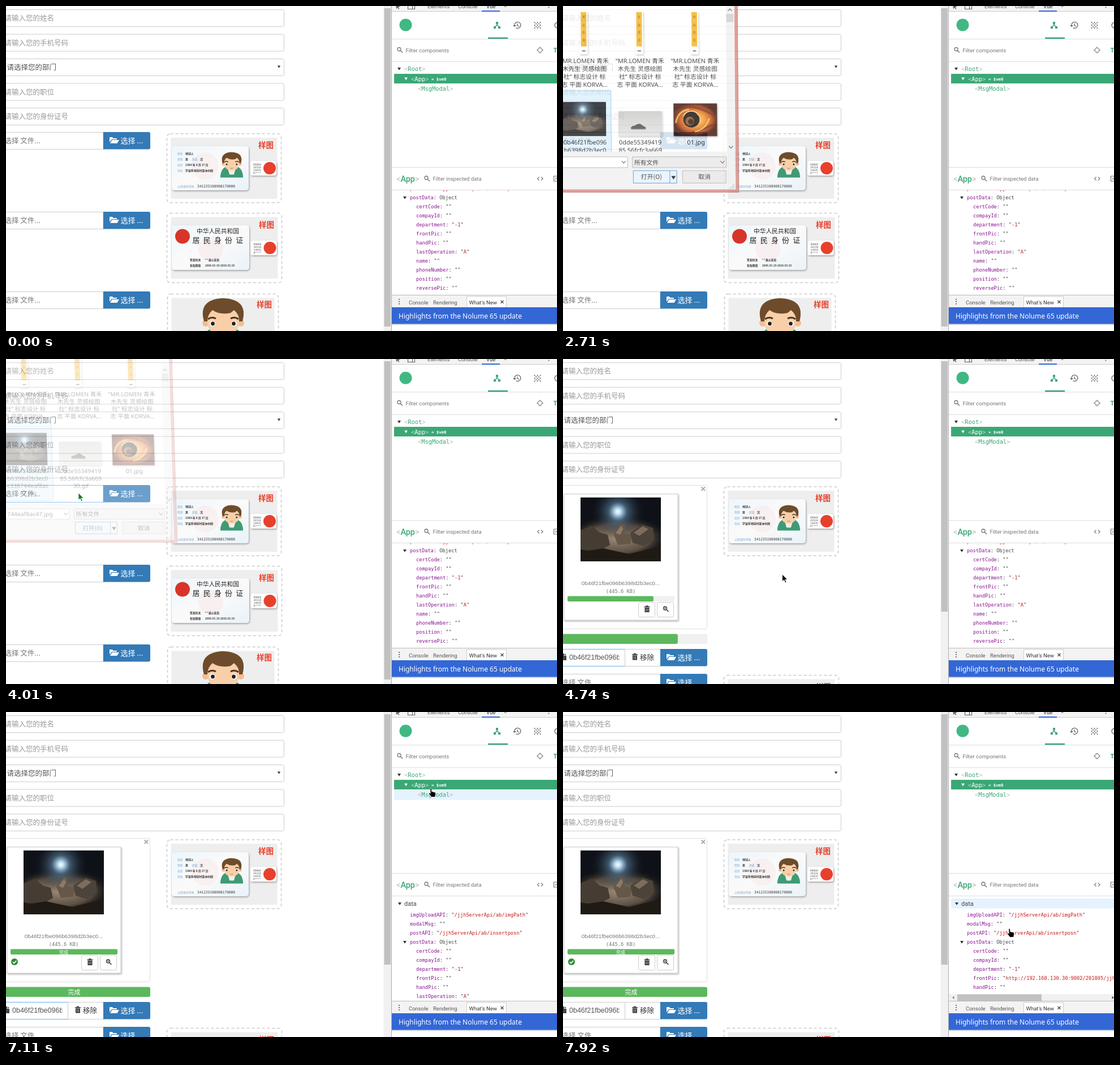
Write an HTML page that moves like this. It is 974 px wide and 575 px high and loops after 8000 ms.

```html
<!DOCTYPE html>
<html lang="zh">
<head>
<meta charset="utf-8">
<title>Upload form</title>
<style>
html,body{margin:0;width:100%;height:100%;overflow:hidden;background:#fff}
svg{display:block}
text{font-family:'Noto Sans CJK SC','Noto Sans CJK','Noto Sans',sans-serif}
.r{font-family:Roboto,sans-serif}
.m{font-family:'DejaVu Sans Mono',monospace}
.a{font-family:'Liberation Sans',Arial,sans-serif}
.n{font-family:'Noto Sans','Noto Sans CJK SC',sans-serif}
.mid{text-anchor:middle}
.b{font-weight:bold}
</style>
</head>
<body>
<svg id="stage" width="974" height="575" viewBox="0 0 974 575"></svg>
<script>
const GREEN = '#3ba776', RED = '#e8402c', LOOP = 8000;
const esc = s => s.replace(/&/g, '&amp;').replace(/</g, '&lt;');
const txt = (x, y, s, size, fill = '#333', cls = '', more = '') =>
  `<text x="${x}" y="${y}" font-size="${size}" fill="${fill}" class="${cls}" ${more}>${esc(s)}</text>`;
const box = (x, y, w, h, fill, more = '') =>
  `<rect x="${x}" y="${y}" width="${w}" height="${h}" fill="${fill}" ${more}/>`;
const path = (d, fill, more = '') => `<path d="${d}" fill="${fill}" ${more}/>`;
const line = (d, color, w = 1, more = '') => path(d, 'none', `stroke="${color}" stroke-width="${w}" ${more}`);
const dot = (x, y, r, fill, more = '') => `<circle cx="${x}" cy="${y}" r="${r}" fill="${fill}" ${more}/>`;
const at = (x, y, inner, more = '') => `<g transform="translate(${x} ${y})" ${more}>${inner}</g>`;
const grp = (id, inner, more = '') => `<g id="${id}" ${more}>${inner}</g>`;
const edge = (c, r = 3) => `stroke="${c}" rx="${r}"`;

const defs = `<defs>
<radialGradient id="glow"><stop offset="0" stop-color="#fff"/><stop offset=".12" stop-color="#b4d8f0"/><stop offset=".35" stop-color="#4d6c86" stop-opacity=".75"/><stop offset="1" stop-color="#10161f" stop-opacity="0"/></radialGradient>
<radialGradient id="dust"><stop offset="0" stop-color="#a08d77"/><stop offset=".6" stop-color="#6b5c4c" stop-opacity=".85"/><stop offset="1" stop-color="#15120f" stop-opacity="0"/></radialGradient>
<radialGradient id="fire"><stop offset="0" stop-color="#ffdf80"/><stop offset=".45" stop-color="#ef8a1c"/><stop offset=".75" stop-color="#b8440a"/><stop offset="1" stop-color="#3a0d04"/></radialGradient>
<linearGradient id="card" x2="1" y2="1"><stop offset="0" stop-color="#edf6fb"/><stop offset=".5" stop-color="#fbfafa"/><stop offset="1" stop-color="#e9f3f9"/></linearGradient>
<linearGradient id="haze" y2="1" x2="0"><stop offset="0" stop-color="#c9c9c7"/><stop offset="1" stop-color="#e2e2e0"/></linearGradient>
<filter id="soft" x="-20%" y="-20%" width="150%" height="150%"><feDropShadow dx="1" dy="1.5" stdDeviation="1.5" flood-opacity=".35"/></filter>
<symbol id="space" viewBox="0 0 142 113" preserveAspectRatio="none">
${box(0, 0, 142, 113, '#0e1117')}
<ellipse cx="66" cy="72" rx="92" ry="42" fill="url(#dust)"/>
${dot(66, 25, 48, 'url(#glow)')}
${path('M0 58 20 50 34 62 48 66 52 84 30 96 0 92Z', '#453c34')}
${path('M58 64 72 46 79 50 76 62 92 66 88 82 66 84Z', '#665849')}
${path('M88 62 110 48 128 54 130 74 112 86 92 80Z', '#4c433a')}
${path('M94 62 110 51 120 56 104 68Z', '#7c6d5d')}
${path('M0 96 40 90 86 100 142 86V113H0Z', '#201a15')}
${path('M62 63 72 50 75 56 70 66Z', '#8b7b6a')}
</symbol>
<clipPath id="listClip">${box(-60, -70, 368, 328, '#000')}</clipPath>
<clipPath id="dataClip"><rect id="dataArea" x="682" y="326" width="292" height="185"/></clipPath>
<clipPath id="nameClip">${box(0, 514, 99.5, 28, '#000')}</clipPath>
</defs>`;

// icons
const folder = path('M0 10V2q0-1 1-1h4l1.5 2h5.5q1 0 1 1v1H4Z', '#fff') + path('M1 12 4.5 6H17l-3.5 6Z', '#fff');
const trash = c => line('M0 2.5H10M3.5 2V.8H6.5V2', c, 1.3) + path('M1 4H9V12H1Z', c) + line('M3.5 5.5V10.5M6.5 5.5V10.5', '#fff', .8);
const pencil = path('M0 9V7L6 1 8 3 2 9ZM6.7.4 7.5-.4 9.4 1.6 8.6 2.4Z', '#777');
const lens = c => dot(0, 0, 3, 'none', `stroke="${c}" stroke-width="1.3"`) + line('M2.2 2.2 6 6', c, 1.5);
const down = (x, y, c = '#333', w = 3) => path(`M${x - w} ${y - 2}h${2 * w}l${-w} ${w * 1.6}Z`, c);
const chev = (x, y, s = 1) => line(`M${x - 3.5} ${y - 2 * s}l3.5 ${4 * s} 3.5 ${-4 * s}`, '#555', 1.2);

// left-hand form
const man =
  path('M-42 95Q-41 62-20 54L0 72 20 54Q41 62 42 95Z', '#3f9a76') +
  path('M-16 56H16L8 84H-8Z', '#f3efe6') +
  dot(-31, 45, 6, '#f1bd93') + dot(31, 45, 6, '#f1bd93') +
  box(-28, 12, 56, 56, '#f8cfa8', 'rx="25"') +
  path('M-34 42Q-45 4-2 1 45 2 34 42L28 42Q29 30 19 22L13 27Q-6 31-19 22-28 30-28 42Z', '#6e4c2b') +
  line('M-27 38Q-20 33-13 37M13 37Q20 33 27 38', '#4b3520', 3) +
  dot(-19, 46, 5, '#fff') + dot(19, 46, 5, '#fff') + dot(-18.5, 46, 3.4, '#222') + dot(18.5, 46, 3.4, '#222') +
  line('M-5 60Q0 63 5 60', '#b5543c', 1.6);

const frame = (x, y, w, h) =>
  box(x, y, w, h, '#fff', 'rx="6" stroke="#ccc" stroke-width="1.6" stroke-dasharray="5 4"') +
  box(x + 7, y + 7, w - 14, h - 14, '#eee');
const sample = (x, y) => txt(x, y, '样图', 13.5, RED, 'b');
const chip = (x, y) => box(x, y, 46, 26, '#fff', 'rx="4" filter="url(#soft)"') +
  ['89860', '2E518', '14035', '8****'].map((s, i) => txt(x + 5, y + 8 + i * 5, s, 4.6, '#555', 'm')).join('') +
  dot(x + 34, y + 13, 11, RED);
const pair = (x, y, k, v) => txt(x, y, k, 4.8, '#6fa5d2') + txt(x + 14, y, v, 4.9, '#333', 'b');

const front = frame(284.5, 226, 202, 122) + sample(446, 251) +
  box(293, 248, 136, 78, 'url(#card)', 'rx="5" filter="url(#soft)"') +
  dot(352, 283, 24, '#f6dfe0', 'opacity=".35"') +
  pair(303, 263, '姓名', '地球人') + pair(303, 273, '性别', '男') + pair(329, 273, '民族', '汉') +
  pair(303, 283, '出生', '1989 年 8 月 17 日') + pair(303, 293, '住址', '宇宙系地球村亚洲中国') +
  txt(303, 320.5, '公民身份号码', 4.9, '#6fa5d2') + txt(338, 321, '341225198908170000', 6.2, '#333', 'm') +
  at(399, 258, `<g transform="scale(.48)">${man}</g>`) + chip(432, 274);

const back = frame(284.5, 366.5, 203, 123) + sample(447, 391.5) +
  box(293, 388, 137, 79, 'url(#card)', 'rx="5" filter="url(#soft)"') +
  dot(362, 430, 22, '#f6dfe0', 'opacity=".4"') + dot(312, 407.5, 13, '#d8352a') +
  txt(337, 402, '中华人民共和国', 10.7, '#222') +
  txt(329.5, 419, '居民身份证', 13, '#222', '', 'letter-spacing="6.2"') +
  txt(325, 451, '签发机关', 4.8, '#333', 'b') + txt(352, 451, '* *县公安局', 4.8, '#333', 'b') +
  txt(325, 461, '有效期限', 4.8, '#333', 'b') + txt(352, 461, '2006.03.19-2016.03.19', 4.7, '#333', 'b') +
  chip(432.5, 415);

const held = frame(285.5, 509.5, 196, 140) + sample(443, 533) + at(384, 516, man);

const pick = y => path(`M172 ${y}H252Q255 ${y} 255 ${y + 3}V${y + 27.5}Q255 ${y + 30.5} 252 ${y + 30.5}H172Z`, '#337ab7') +
  at(183, y + 8, folder) + txt(202.5, y + 20, '选择 ...', 13, '#fff');
const fileRow = (y, id = '') => box(-10, y + .5, 182, 30, '#fff', `stroke="#ccc" id="${id}"`) +
  txt(-2.5, y + 19.5, '选择 文件...', 12.5, '#777') + pick(y);

const labels = ['请输入您的姓名', '请输入您的手机号码', '', '请输入您的职位', '请输入您的身份证号'];
const fields = labels.map((s, i) => {
  const y = 6.5 + i * 43.5;
  return box(-10, y, 501.5, 30, '#fff', edge('#ccc')) + (s ? txt(-2.5, y + 19.5, s, 12.5, '#999')
    : txt(1.5, y + 19.5, '请选择您的部门', 12.5, '#555') + down(482.5, y + 14, '#333', 2.6));
}).join('');

const tool = (x, icon) => box(x + .5, 430.5, 29, 26, '#fff', edge('#ccc', 2)) + icon;
const done = box(-10, 223.5, 264.5, 254, '#fff', edge('#ddd')) +
  line('M244.5 226.5l6.5 6.5m0-6.5l-6.5 6.5', '#aaa', 1.8) +
  box(2, 239, 201, 223, '#fff', 'stroke="#ccc" filter="url(#soft)"') +
  '<use href="#space" x="31" y="245" width="142" height="113"/>' +
  txt(102, 400, '0b46f21fbe096b6398d2b3ec0...', 9.8, '#777', 'a mid') +
  txt(102, 413.5, '(445.6 KB)', 8.7, '#777', 'm mid') +
  box(8, 419.5, 189, 9.5, '#f0f0f0', 'rx="2"') + box(8, 419.5, 0, 9.5, '#5cb85c', 'rx="2" id="bar1"') +
  box(-10, 486.5, 265, 17.5, '#f0f0f0', 'rx="3"') + box(-10, 486.5, 0, 17.5, '#5cb85c', 'rx="3" id="bar2"') +
  grp('doneText', txt(102, 427.5, '完成', 8, '#fff', 'mid') + txt(120.5, 499.5, '完成', 11, '#fff', 'mid') +
    dot(15, 442, 6, '#2f8a36') + line('M12 442l2.3 2.5 4-4.5', '#fff', 1.8)) +
  tool(133, at(143.5, 436, trash('#333'))) + tool(166, at(180.5, 441, lens('#333') + line('M-1.5 0h3M0-1.5v3', '#333', .9))) +
  box(-10, 513.5, 119.5, 30, '#fff', 'stroke="#66afe9" id="nameBox"') +
  path('M-3 521H2V525H6V533H-3Z', '#444') + path('M3 521L6 524H3Z', '#444') +
  txt(11, 532, '0b46f21fbe096b6398', 12.5, '#555', 'a', 'clip-path="url(#nameClip)"') +
  box(109.5, 513.5, 63, 30, '#fff', 'stroke="#ccc"') + at(122, 520.5, trash('#333')) +
  txt(136, 532.5, '移除', 12.5) + pick(513);

const page = fields + front + grp('idle', fileRow(223, 'file1')) + grp('done', done) +
  grp('lower', fileRow(364) + back + fileRow(505) + held) +
  box(667.5, 0, 14, 575, '#f1f1f1') + box(668.5, 4, 11.5, 563, '#c1c1c1', 'id="thumb"');

// developer panel
const tag = (x, y, name, c, gray) => `<text x="${x}" y="${y}" font-size="10.4" class="m" fill="${gray}">&lt;<tspan fill="${c}">${name}</tspan>&gt;</text>`;
const CH = 5.24;
const prop = (x, y, key, val) => `<text x="${x}" y="${y}" font-size="8.7" class="m" fill="#444"><tspan fill="#881391">${key}</tspan>: "<tspan fill="#c41a16">${val}</tspan>"</text>`;
const props = [['certCode', ''], ['compayId', ''], ['department', '-1'], ['frontPic', ''], ['handPic', ''],
  ['lastOperation', 'A'], ['name', ''], ['phoneNumber', ''], ['position', ''], ['reversePic', '']];
const rowY = i => 423 + i * 15.95;

const data = box(686, 330, 288, 17.5, '#e5f2ff', 'id="dataHover"') +
  down(696, 339) + txt(704, 343, 'data', 11, '#444', 'r') +
  prop(714, 362, 'imgUploadAPI', '/jjhServerApi/ab/imgPath') + prop(714, 378, 'modalMsg', '') +
  prop(714, 394, 'postAPI', '/jjhServerApi/ab/insertposn') + down(705, 407) +
  `<text x="714" y="410" font-size="8.7" class="m" fill="#444"><tspan fill="#881391">postData</tspan>: Object</text>` +
  props.map(([k, v], i) => grp('row' + i, prop(725, rowY(i) + 3, k, v))).join('') +
  grp('url', prop(725, rowY(3) + 3, 'frontPic', 'http://192.168.130.30:9002/201805/jjhServer')) +
  grp('tools', at(0, -4.5, pencil) + at(26, -4.5, `<g transform="scale(.8)">${trash('#777')}</g>`));

const grains = [[0, -5], [-5, 0], [0, 0], [5, 0], [0, 5], [-2.5, -2.5], [2.5, -2.5], [-2.5, 2.5], [2.5, 2.5], [-5, -5], [5, -5], [-5, 5], [5, 5]]
  .map(([x, y]) => dot(939.5 + x, 34 + y, 1.1, '#666')).join('');

const panel = box(682, 0, 292, 575, '#fff') + line('M681.5 0V575', '#aaa') +
  box(682, 0, 292, 9.5, '#f3f3f3') + line('M682 9.5H974', '#ccc') +
  path('M689-3 697 1 693.5 2 695.5 5 694 5.5 692 3 690 5Z', '#666') + line('M710.5-3V5.5H722.5V-3M718.5 0V5.5', '#666', 1.2) +
  txt(745, 4, 'Elements', 9.5, '#555', 'r') + txt(799, 4, 'Console', 9.5, '#555', 'r') + txt(849, 4, 'Vue', 9.5, '#333', 'r') +
  txt(880, 3, '»', 11, '#555', 'r') + dot(959.5, 2.5, 1, '#555') + box(841, 8, 32, 2, '#3367d6') +
  dot(706.5, 33.5, 11, '#41b883') +
  at(868, 34, line('M0-3V0M0-1L-4 4M0-1L4 4', GREEN, 1.6) + box(-2, -6, 4, 4, GREEN) + box(-6, 2, 4, 4, GREEN) + box(2, 2, 4, 4, GREEN)) +
  box(852, 55.5, 35, 2.5, GREEN) +
  at(904, 34, line('M-5 1A5.5 5.5 0 1 1-2.5 4.5M0-3V.5L3 2', '#666', 1.3) + path('M-8 0H-2L-5 3Z', '#666')) + grains +
  dot(975, 34, 5, 'none', 'stroke="#666" stroke-width="1.3"') +
  line('M682 58.5H974M682 98.5H974M682 285.5H974M682 325.5H974', '#ddd') +
  at(695, 76.5, lens('#777')) + txt(706.5, 81.5, 'Filter components', 9.5, '#777', 'r') +
  dot(944, 78, 4, 'none', 'stroke="#777"') + line('M944 72v3M944 81v3M938 78h3M947 78h3', '#777') + txt(967.5, 82, 'T', 11, GREEN, 'r b') +
  down(695, 111) + tag(704, 115, 'Root', GREEN, '#bbb') +
  box(686, 120, 288, 17, GREEN) + down(707, 128.5, '#fff') + tag(716, 132.5, 'App', '#fff', '#b4dfcb') +
  txt(752, 132, '= $vm0', 7.3, '#fff', 'm b') +
  box(686, 138, 288, 17.5, '#e5f2ff', 'id="treeHover"') + tag(728, 149.5, 'MsgModal', GREEN, '#bbb') +
  `<text x="690" y="310.5" font-size="14.5" class="r" fill="#bbb">&lt;<tspan fill="${GREEN}" font-weight="500">App</tspan>&gt;</text>` +
  at(743, 304, lens('#777')) + txt(754.5, 309, 'Filter inspected data', 9.5, '#777', 'r') +
  line('M942.5 302.5l-3 3 3 3M946 302.5l3 3-3 3', '#777', 1.2) + line('M974 301H968.5V310H974M971 307l3-3', '#777', 1.2) +
  `<g clip-path="url(#dataClip)">${grp('data', data)}</g>` +
  grp('hbar', box(682, 499, 292, 12, '#f1f1f1') + box(697, 499.5, 149, 11.5, '#c1c1c1') +
    path('M691.5 502.5V508L688 505.2Z', '#d66') + path('M970.5 502.5V508L974 505.2Z', '#555')) +
  box(682, 511.5, 292, 22, '#f3f3f3') + line('M682 511.5H974', '#bbb') +
  [519, 523, 527].map(y => dot(695, y, 1.1, '#555')).join('') +
  txt(712, 527.5, 'Console', 9.5, '#555', 'r') + txt(755, 527.5, 'Rendering', 9.5, '#555', 'r') +
  box(814.5, 514, 70, 20, '#fff', 'stroke="#ccc"') + txt(818.5, 527.5, "What's New", 9.5, '#333', 'r') +
  line('M874.5 521l5 5m0-5l-5 5', '#444', 1.3) +
  box(682, 562, 292, 2.5, '#ddd') + box(682, 533, 292, 29.5, '#3367d6') +
  txt(694, 552.5, 'Highlights from the Nolume 65 update', 12, '#fff', 'n');

// file dialog
const names = (cx, y, list) => list.map((s, i) => txt(cx, y + i * 14, s, 11, '#222', 'n mid')).join('');
const strip = x => box(x - 7, 5, 14, 77, '#fff', 'filter="url(#soft)"') + box(x - 5, 6, 10, 62, '#f2b21c') +
  [12, 27, 40, 54].map(y => box(x - 2, y, 4, 5, '#c98a18')).join('') + box(x - 3, 75, 6, 2, '#555');
const planet = box(198, 171, 78, 59, 'url(#fire)', 'filter="url(#soft)"') +
  line('M200 190Q212 172 236 178T274 196M204 222Q220 230 244 220T272 208', '#6b1c06', 4, 'opacity=".7"') +
  line('M202 206Q206 184 226 182M236 222Q256 218 262 198', '#ffc44e', 3, 'opacity=".8"') +
  dot(230, 200, 14.5, '#150805') + dot(227, 203, 8, '#8a4a1c') + dot(229, 204, 5, '#2a1208') +
  line('M216 194A15 15 0 0 1 243 193', '#ffe09a', 1.5);
const list = [38, 137.5, 236.5].map(x => strip(x) +
    names(x + 1, 98.5, ['“MR.LOMEN 青禾', '木先生 灵感绘图', '社” 标志设计 标', '志 平面 KORVA...'])).join('') +
  box(-20, 148, 106, 150, '#dcf0fd', 'stroke="#8cc6ee"') +
  '<use href="#space" x="-1" y="168" width="78" height="62"/>' +
  names(39, 245.5, ['0b46f21fbe096', 'b6398d2b3ec0', 'c338744eaf8ac', '47.jpg']) +
  box(99, 185, 78, 45, 'url(#haze)', 'filter="url(#soft)"') +
  path('M121 215Q124 211 129 211 133 207 138 208L144 212 148 214V217H122Z', '#4c4a47') + box(122, 216.5, 26, 1.5, '#777') +
  names(138, 245.5, ['0dde55349419', '85.56fcfc3a669', '30.gif']) + planet +
  names(238, 245.5, ['01.jpg']);
const dialog = box(-60, -70, 374, 401.5, '#d98a82', 'stroke="#b06a64"') + box(-60, -70, 368.5, 396.5, '#f0f0f0') +
  box(-60, -70, 368, 328, '#fff') + `<g clip-path="url(#listClip)">${grp('list', list)}</g>` +
  box(293.5, -10, 14, 268, '#f0f0f0') + box(294, 9, 13, 15, '#cdcdcd') + chev(300.5, 2, -1) + chev(300.5, 250) +
  box(-20, 267.5, 135, 19.5, '#fff', 'stroke="#aaa"') + chev(108, 277) + txt(-1, 281, '744eaf8ac47.jpg', 11, '#222', 'n', 'id="chosen"') +
  box(123.5, 267.5, 168.5, 19.5, '#e8e8e8', 'stroke="#aaa"') + txt(127, 281.5, '所有文件', 10.9, '#222') + chev(285, 277) +
  box(125, 292.5, 78, 22.5, '#e6f1fb', 'stroke="#3c8fd8"') + line('M190.5 293V315', '#3c8fd8') + down(197, 304, '#111', 4) +
  txt(157.5, 308, '打开(O)', 11, '#222', 'mid') +
  box(213.5, 292.5, 78, 22.5, '#e6e6e6', 'stroke="#b0b0b0"') + txt(252.5, 308, '取消', 11, '#222', 'mid') +
  [[305, 318], [305, 321], [305, 324], [302, 321], [302, 324], [299, 324]].map(([x, y]) => box(x - 1, y - 1, 1.6, 1.6, '#aaa')).join('');

const pointer = 'stroke="#fff" stroke-width=".8"';
const cursor = path('M0 0V12.5L3 9.8 5.2 14.8 7.2 13.9 5 9.2H9Z', '#000', pointer + ' id="arrow"') +
  path('M-1.2 1Q0-1 1.5 1V5.5L7.5 7Q9 7.5 8.5 10L7.5 15.5H1L-3.5 9.5Q-4 7.5-2 8L-.8 9Z', '#000', pointer + ' id="hand"');

const stage = document.getElementById('stage');
stage.innerHTML = defs + box(0, 0, 974, 575, '#fff') + page + panel + grp('dialog', dialog) + grp('cursor', cursor);

const $ = id => document.getElementById(id);
const set = (id, k, v) => $(id).setAttribute(k, v);
const show = (id, on) => set(id, 'display', on ? 'inline' : 'none');
const clamp = x => Math.max(0, Math.min(1, x));
const ease = x => x * x * (3 - 2 * x);
// keys: [time, value...]; eased between neighbours
function tween(keys, t, f = ease) {
  let i = 0;
  while (i < keys.length - 2 && t >= keys[i + 1][0]) i++;
  const [t0, ...a] = keys[i], [t1, ...b] = keys[i + 1], k = f(clamp((t - t0) / (t1 - t0)));
  return a.map((v, j) => v + (b[j] - v) * k);
}
const trail = [[0, 836, 590], [250, 836, 585], [980, 305, 311], [1060, 304, 308], [1650, 249, 246], [1980, 249, 246],
  [2600, -15, 215], [3540, -15, 215], [3850, 60, 222], [4010, 128, 237], [4310, 190, 334], [4420, 200, 338],
  [5180, 688, 450], [5380, 735, 470], [5660, 748, 344], [5750, 748, 344], [6000, 756, 352], [6400, 756, 352],
  [6830, 752, 166], [7020, 751, 135], [7300, 751, 135], [7850, 789, 383], [8000, 789, 383]];
const fade = [[2520, 0], [2760, 1], [3900, 1], [4010, .28], [4125, .28], [4170, 0]];
const skew = [.95, 0, .0275, .926, -4.6, 17.5], flat = [1, 0, 0, 1, 0, 0];

function render(t) {
  const [cx, cy] = tween(trail, t);
  set('cursor', 'transform', `translate(${cx} ${cy})`);
  show('arrow', t < 5400);
  show('hand', t >= 5400);
  set('arrow', 'fill', t > 3900 && t < 4200 ? '#0b7a1c' : '#000');

  const up = t >= 4470, p = clamp((t - 4500) / 300);
  show('idle', !up);
  show('done', up);
  set('lower', 'transform', `translate(0 ${up ? 193 : 0})`);
  set('thumb', 'height', up ? 443 : 563);
  set('bar1', 'width', 189 * p);
  set('bar2', 'width', 265 * p);
  show('doneText', p === 1);
  set('file1', 'stroke', t > 1900 ? '#66afe9' : '#ccc');
  set('nameBox', 'stroke', t < 7400 ? '#66afe9' : '#ccc');

  const [k] = tween(fade, t, x => x), m = clamp((1 - k) / .72);
  show('dialog', k > 0);
  set('dialog', 'opacity', k);
  set('dialog', 'transform', `matrix(${flat.map((v, i) => v + (skew[i] - v) * m)})`);
  const chosen = t > 3780;
  show('chosen', chosen);
  set('list', 'transform', `translate(0 ${chosen ? -46 : 0})`);

  const [scroll] = tween([[6120, -68], [6380, 0]], t);
  set('data', 'transform', `translate(0 ${scroll})`);
  const row = Math.floor((cy + 10 - scroll - 415) / 15.95);
  const hover = t > 5300 && t < 6600 && row >= 0 && row < props.length;
  show('tools', hover);
  if (hover) {
    const [key, val] = props[row];
    set('tools', 'transform', `translate(${735 + (key.length + val.length + 4) * CH} ${rowY(row)})`);
  }
  show('treeHover', t > 6900 && t < 7400);
  show('dataHover', t > 7760);
  const filled = t >= 7500;
  show('row3', !filled);
  show('url', filled);
  show('hbar', filled);
  set('dataArea', 'height', filled ? 173 : 185);
}
function tick() {
  render(performance.now() % LOOP);
  requestAnimationFrame(tick);
}
tick();
</script>
</body>
</html>
```
